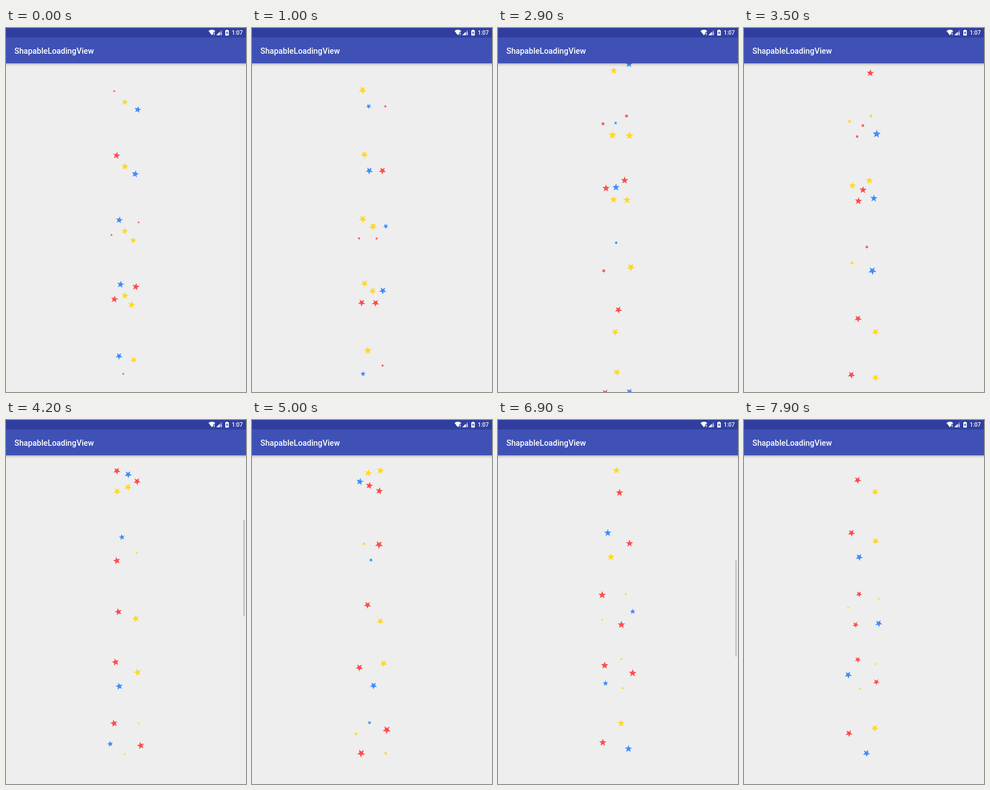
An HTML page with a canvas for the animation above (8000 ms loop, 429 by 650 pixels).

```html
<!DOCTYPE html>
<html lang="en">
<head>
<meta charset="utf-8">
<title>ShapableLoadingView</title>
<style>
html, body { margin: 0; width: 100%; height: 100%; overflow: hidden; background: #eee; }
canvas, svg { position: absolute; left: 0; top: 0; }
text { font-family: Roboto, sans-serif; font-weight: 500; fill: #fff; }
</style>
</head>
<body>
<canvas id="stage" width="429" height="650"></canvas>
<svg width="429" height="72" viewBox="0 0 429 72">
  <defs>
    <linearGradient id="shade" x2="0" y2="1">
      <stop stop-opacity=".26"/>
      <stop offset=".4" stop-opacity=".09"/>
      <stop offset="1" stop-opacity="0"/>
    </linearGradient>
  </defs>
  <rect y="63" width="429" height="6" fill="url(#shade)"/>
  <rect width="429" height="63" fill="#3f51b5"/>
  <rect width="429" height="17" fill="#303f9f"/>
  <g fill="#fff">
    <path d="M362 5.3Q368 .9 374 5.3L372.6 7H370.6V10L368 13Z"/>
    <path d="M371.6 8h1.3v3h-1.3zM371.6 11.8h1.3v1.2h-1.3z"/>
    <path d="M376 13L386 3V13Z" opacity=".35"/>
    <path d="M376 13L382 7V13Z"/>
    <path d="M384 8h1.3v3h-1.3zM384 11.8h1.3v1.2h-1.3z"/>
    <path d="M392 4h1.8V3h2.6v1h1.8v9.5h-6.2z"/>
  </g>
  <path d="M395.6 5L393.3 9.2H394.8V12.3L397 8H395.6Z" fill="#303f9f"/>
  <text x="403.5" y="12" font-size="10">1:07</text>
  <text x="15" y="45.5" font-size="14.3">ShapableLoadingView</text>
</svg>
<script>
const ctx = document.getElementById('stage').getContext('2d');
const LOOP = 8, TAU = Math.PI * 2;
const BIG = 27.3, SMALL = 21.6;
const COLORS = { R: '#ff4b4b', Y: '#ffd91f', B: '#3d8cff' };
const PULSE = { R: 0, Y: 1 / 3, B: 2 / 3 };

const frac = v => v - Math.floor(v);

// Paths map 0..1 to a point around the row centre.
const eight = h => p => {
  const a = p * TAU;
  return [h * .89 * (Math.sin(a) - .08 * Math.sin(3 * a)), 19.2 * Math.sin(2 * a)];
};
const circle = h => p => [h * Math.cos(p * TAU), h * Math.sin(p * TAU)];
function polygon(points) {
  const sides = points.map(([x, y], i) => {
    const [u, v] = points[(i + 1) % points.length];
    return { x, y, dx: u - x, dy: v - y, len: Math.hypot(u - x, v - y) };
  });
  const total = sides.reduce((sum, s) => sum + s.len, 0);
  return p => {
    let d = p * total, i = 0;
    while (i < sides.length - 1 && d > sides[i].len) d -= sides[i++].len;
    const s = sides[i], k = d / s.len;
    return [s.x + s.dx * k, s.y + s.dy * k];
  };
}
const triangle = h => polygon([[0, -h], [h, h], [-h, h]]);
const square = h => polygon([[-h, -h], [h, -h], [h, h], [-h, h]]);

// path, star colours along it, start, laps per second, pulsing, tilt
const rows = [
  [eight(BIG), 'BYR', .175, .366, true, 10],
  [eight(SMALL), 'BYR', .175, .366, false, 10],
  [eight(BIG), 'BYRYR', .91, .366, true, 10],
  [eight(SMALL), 'BYRYR', .91, .366, false, 10],
  [triangle(BIG), 'BYR', .854, .73, true, 38],
  [triangle(SMALL), 'RY', .081, 1.361, false, 38],
  [square(SMALL), 'BRY', .39, -1.357, false, 38],
  [square(BIG), 'BRYRY', .627, -.9034, true, 38],
  [circle(BIG), 'BRYRY', .627, -.9034, true, 38],
  [circle(BIG), 'BRY', .356, -.9034, false, 38]
];

// start, duration, distance, easing power, end of the scrollbar fade
const flings = [
  [1.87, .66, 184, 2, 2.7],
  [3.65, .6, 183.5, 2, 4.5],
  [5.95, .85, 229.5, 3, 7.35]
];

function star(x, y, r, deg, color) {
  ctx.beginPath();
  for (let i = 0; i < 10; i++) {
    const a = deg * TAU / 360 + i * TAU / 10, k = i % 2 ? r * .42 : r;
    ctx.lineTo(x + k * Math.sin(a), y - k * Math.cos(a));
  }
  ctx.fillStyle = color;
  ctx.fill();
}

function draw(t) {
  let scroll = 0, bar = 0;
  for (const [start, dur, dist, power, end] of flings) {
    const u = Math.min(1, Math.max(0, (t - start) / dur));
    scroll += dist * (1 - (1 - u) ** power);
    if (t > start && t < end) bar = Math.min(1, (end - t) / .25);
  }

  ctx.fillStyle = '#eee';
  ctx.fillRect(0, 0, 429, 650);

  rows.forEach(([path, stars, from, rate, pulsing, tilt], row) => {
    const cy = 130.3 + 115 * row - scroll;
    [...stars].forEach((c, i) => {
      const [x, y] = path(frac(from + rate * t + i / stars.length));
      const wave = Math.cos(TAU * (.486 + 1.103 * t + PULSE[c]));
      star(213.5 + x, cy + y, pulsing ? 5 + 2.6 * wave : 6.8, tilt + 245 * t, COLORS[c]);
    });
  });

  ctx.fillStyle = `rgba(0,0,0,${.16 * bar})`;
  ctx.fillRect(424, 63 + scroll * .314, 3, 172);
}

const begin = performance.now();
function tick() {
  draw((performance.now() - begin) / 1000 % LOOP);
  requestAnimationFrame(tick);
}
tick();
</script>
</body>
</html>
```
